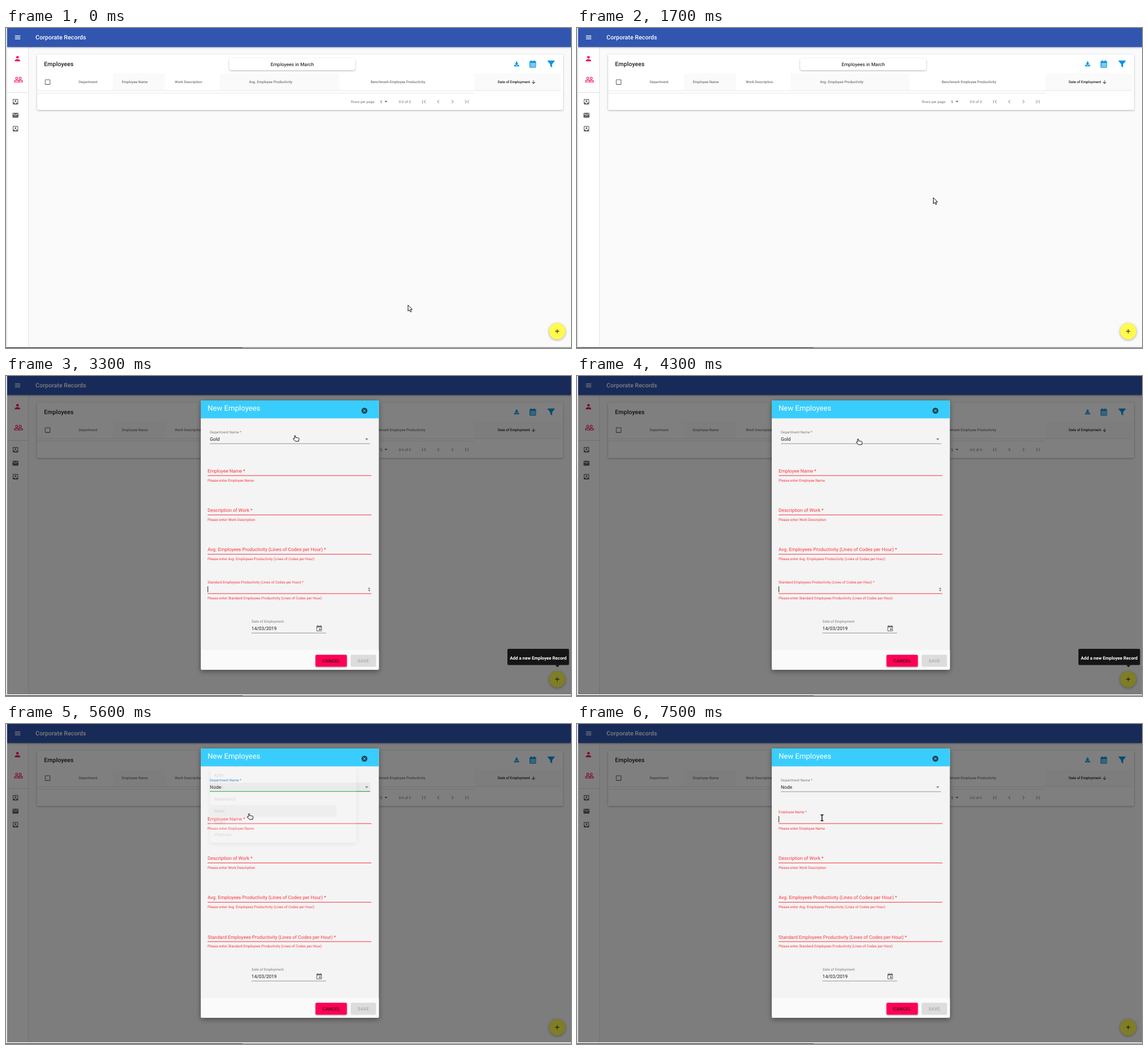
Recreate the animation shown at these times as an HTML page. Size 995 by 563 pixels, loop 8000 ms.

```html
<!DOCTYPE html>
<html lang="en">
<head>
<meta charset="utf-8">
<title>Corporate Records</title>
<style>
  html, body { margin: 0; width: 100%; height: 100%; overflow: hidden; background: #fafafa; }
  svg { display: block; width: 995px; height: 563px; font-family: Roboto, sans-serif; text-rendering: geometricPrecision; }
  text { white-space: pre; }
  .card { filter: drop-shadow(0 1px 1.5px rgba(0,0,0,.3)); }
  .raised { filter: drop-shadow(0 1.5px 2px rgba(0,0,0,.35)); }
  .high { filter: drop-shadow(0 3px 5px rgba(0,0,0,.4)); }
  #menu { transform-origin: 359px 112px; }
  #tip { transform-origin: 971px 513px; }
</style>
</head>
<body>
<svg id="stage" viewBox="0 0 995 563"></svg>
<script>
const LOOP = 8000;
const GREY = '#757575', RED = '#f9343f', BLUE = '#0596de', PINK = '#f50057', INK = '#1c1c1c';
const SMALL = 6.28, BODY = 8.38, TITLE = 10.47;

// 24 x 24 glyphs
const glyphs = {
  burger: 'M3 18h18v-2H3zM3 13h18v-2H3zM3 6v2h18V6z',
  person: 'M12 12a4 4 0 1 0 0-8 4 4 0 0 0 0 8zm0 2c-2.67 0-8 1.34-8 4v2h16v-2c0-2.66-5.33-4-8-4z',
  inbox: 'M19 3H5a2 2 0 0 0-2 2v14c0 1.1.9 2 2 2h14a2 2 0 0 0 2-2V5a2 2 0 0 0-2-2zm0 12h-4a3 3 0 0 1-6 0H5V5h14zm-3-5h-2V7h-4v3H8l4 4z',
  mail: 'M20 4H4a2 2 0 0 0-2 2v12c0 1.1.9 2 2 2h16a2 2 0 0 0 2-2V6a2 2 0 0 0-2-2zm0 4l-8 5-8-5V6l8 5 8-5z',
  box: 'M19 5v14H5V5h14m0-2H5a2 2 0 0 0-2 2v14c0 1.1.9 2 2 2h14a2 2 0 0 0 2-2V5a2 2 0 0 0-2-2z',
  down: 'M20 12l-1.4-1.4L13 16.2V4h-2v12.2l-5.6-5.6L4 12l8 8z',
  first: 'M18.4 16.6L13.8 12l4.6-4.6L17 6l-6 6 6 6zM6 6h2v12H6z',
  prev: 'M15.4 16.6L10.8 12l4.6-4.6L14 6l-6 6 6 6z',
  next: 'M8.6 16.6l4.6-4.6-4.6-4.6L10 6l6 6-6 6z',
  last: 'M5.6 7.4l4.6 4.6-4.6 4.6L7 18l6-6-6-6zM16 6h2v12h-2z',
  drop: 'M7 9.5l5 5 5-5z',
  plus: 'M19 13h-6v6h-2v-6H5v-2h6V5h2v6h6z',
  event: 'M17 12h-5v5h5zM16 1v2H8V1H6v2H5a2 2 0 0 0-2 2v14c0 1.1.9 2 2 2h14a2 2 0 0 0 2-2V5a2 2 0 0 0-2-2h-1V1zm3 18H5V8h14z',
  close: 'M12 2a10 10 0 1 0 0 20 10 10 0 0 0 0-20zm5 13.6L15.6 17 12 13.4 8.4 17 7 15.6l3.6-3.6L7 8.4 8.4 7l3.6 3.6L15.6 7 17 8.4 13.4 12z',
  download: 'M9 3h6v7h5l-8 8-8-8h5zM2 16h5l5 4 5-4h5v6H2z',
  filter: 'M1 1h22v2l-8 9v11l-6-5v-6L1 3z',
  spin: 'M12 3l5 6H7zM12 21l5-6H7z'
};

const icon = (name, x, y, color, size = 12.57) =>
  `<path d="${glyphs[name]}" fill="${color}" fill-rule="evenodd" transform="translate(${x - size / 2} ${y - size / 2}) scale(${size / 24})"/>`;
const text = (x, y, value, size = BODY, color = INK, extra = '') =>
  `<text x="${x}" y="${y}" font-size="${size}" fill="${color}" ${extra}>${value}</text>`;
const rect = (x, y, w, h, fill, extra = '') =>
  `<rect x="${x}" y="${y}" width="${w}" height="${h}" fill="${fill}" ${extra}/>`;
const group = (id, ...parts) => `<g id="${id}">${parts.join('')}</g>`;
const medium = 'font-weight="500"';
const spaced = medium + ' letter-spacing=".08"';

const people = `<g transform="translate(13.8 82.6) scale(.68)" fill="none" stroke="${PINK}" stroke-width="1.6">
  <circle cx="7.5" cy="8.5" r="2.8"/><circle cx="16.5" cy="8.5" r="2.8"/>
  <path d="M1.75 18.2v-2c0-1.4 3.4-2.5 5.75-2.5s5.75 1.1 5.75 2.5v2zM13.25 18.2h9v-2c0-1.4-3.4-2.5-5.75-2.5-1.3 0-2.7.3-3.8.8"/></g>`;

function calendar() {
  let cells = '';
  for (let row = 0; row < 3; row++)
    for (let col = 0; col < 4; col++)
      cells += rect(923.6 + col * 2.35, 61.7 + row * 2.5, 1.6, 1.7, '#fff');
  return rect(922, 58.3, 11.4, 11.5, BLUE, 'rx="1"') + rect(924.2, 57, 1.8, 3, BLUE, 'rx=".6"')
    + rect(929.3, 57, 1.8, 3, BLUE, 'rx=".6"') + cells;
}

function page() {
  const heads = [[128, 'Department'], [204, 'Employee Name'], [297.3, 'Work Description'],
    [428, 'Avg. Employee Productivity'], [642.3, 'Benchmark Employee Productivity']];
  const pager = [['first', 736], ['prev', 761.3], ['next', 786.3], ['last', 811.3]];
  return [
    rect(0, 0, 995, 563, '#fafafa'),
    rect(2, 33, 37.5, 528, '#fff'), rect(39, 33, 1, 528, '#e4e4e4'), rect(2, 113, 37, 1, '#dedede'),
    rect(2, 0, 993, 33.5, '#3156b0', 'class="card"'),
    icon('burger', 20.5, 16.5, '#fff'),
    text(52, 20.2, 'Corporate Records', TITLE, '#fff', spaced),
    icon('person', 20.2, 53.8, PINK, 14), people,
    icon('inbox', 16.7, 129.8, '#636363'), icon('mail', 16.7, 153.5, '#636363'), icon('inbox', 16.7, 177.3, '#636363'),
    rect(54.7, 46.6, 926.3, 97.7, '#fff', 'rx="2" class="card"'),
    text(67, 67.2, 'Employees', TITLE, INK, spaced),
    rect(393, 53.3, 222, 21, '#fff', 'rx="4" class="card"'),
    text(504, 66.6, 'Employees in March', BODY, '#000', 'text-anchor="middle" letter-spacing=".06"'),
    icon('download', 899.2, 63, BLUE, 10.5), calendar(), icon('filter', 960, 63.5, BLUE, 13.4),
    rect(188, 80, 92, 30, '#fafafa'), rect(376, 80, 210, 30, '#fafafa'), rect(825, 80, 152, 30, '#fafafa'),
    icon('box', 73.3, 95.2, '#636363'),
    ...heads.map(([x, label]) => text(x, 97.4, label, SMALL, GREY, medium)),
    text(866, 97.4, 'Date of Employment', SMALL, INK, medium), icon('down', 929, 95.2, INK, 9.4),
    rect(55, 109.8, 922, .8, '#e0e0e0'), rect(55, 114, 770, .8, '#e0e0e0'),
    text(607.3, 131.9, 'Rows per page:', SMALL, GREY), text(658.7, 131.9, '5', SMALL, '#555'),
    icon('drop', 669.2, 129.6, '#636363'), text(691.8, 131.9, '0-0 of 0', SMALL, GREY),
    ...pager.map(([name, x]) => icon(name, x, 129.6, '#9a9a9a')),
    `<circle cx="970.7" cy="533.6" r="14.4" fill="#fffa4d" class="raised"/>`,
    icon('plus', 970.7, 533.6, INK)
  ].join('');
}

function field(y, label, help, id = '') {
  const resting = text(355, y - 5.2, label + ' *', BODY, RED);
  const floated = text(355, y - 18, label + ' *', SMALL, RED);
  return (id ? group(id + 'Rest', resting) + group(id + 'Float', floated) : resting)
    + rect(355, y - .3, 288.5, 1, RED) + text(355, y + 10.6, 'Please enter ' + help, SMALL, RED);
}

function dialog() {
  const avg = 'Avg. Employees Productivity (Lines of Codes per Hour)';
  const standard = 'Standard Employees Productivity (Lines of Codes per Hour)';
  const department = color => text(359, 100.7, 'Department Name *', SMALL, color);
  return group('dialog',
    rect(2, 0, 993, 560, 'rgba(0,0,0,.5)'),
    rect(343, 43, 313.6, 473.7, '#f4f4f4', 'rx="2" class="high"'),
    `<path d="M343 74.5V45q0-2 2-2h309.6q2 0 2 2v29.5z" fill="#39cdfd"/>`,
    rect(343, 482, 313.6, 34.7, '#fafafa', 'rx="2"'),
    text(355, 61, 'New Employees', 13.08, '#fff'),
    icon('close', 631.2, 61, '#124252'),
    group('plain', department('#7a7a7a'), rect(359, 118.6, 282.3, .9, '#8b8b8b')),
    group('focused', rect(359, 103.5, 282.3, 15, '#e8e8e8'), department('#0a78c8'), rect(359, 118, 282.3, 1.2, '#27a844')),
    group('gold', text(359, 114, 'Gold')), group('node', text(359, 114, 'Node')),
    icon('drop', 635.2, 111.3, '#666'),
    field(175, 'Employee Name', 'Employee Name', 'name'),
    field(244.2, 'Description of Work', 'Work Description'),
    field(313.4, avg, avg),
    field(382.7, standard, standard, 'std'),
    group('spinner', icon('spin', 639.6, 375.5, '#444', 8.6)),
    group('stdCaret', rect(355, 370, 1, 10.5, '#222')),
    group('nameCaret', rect(355, 162, 1, 11, '#222')),
    text(432.4, 434, 'Date of Employment', SMALL, '#7a7a7a'),
    text(432.2, 447, '14/03/2019'),
    rect(432.2, 451.7, 131.5, .9, '#8b8b8b'), icon('event', 551.5, 444.3, '#666'),
    rect(545, 490.5, 55.3, 21, '#ff0057', 'rx="2" class="card"'),
    text(572.6, 503.6, 'CANCEL', 7.85, '#33000f', medium + ' text-anchor="middle" letter-spacing=".22"'),
    rect(607, 490.5, 44.7, 21, '#dcdcdc', 'rx="2"'),
    text(629.4, 503.6, 'SAVE', 7.85, '#a9a9a9', medium + ' text-anchor="middle" letter-spacing=".22"'));
}

function menu() {
  const items = ['KZW', 'Gold', 'Material-UI', 'Node', 'React', 'Platinum'];
  const rowY = i => 73.4 + i * 25.1;
  const bar = i => rect(359.3, rowY(i), 282.4, 25.1, '#e0e0e0');
  const label = (i, extra) => text(367.6, rowY(i) + 15.5, items[i], BODY, INK, extra);
  return group('menu',
    rect(359.3, 69.7, 282.4, 158.3, '#fff', 'rx="2" class="high"'),
    group('hover', rect(359.3, rowY(3), 282.4, 25.1, '#ebebeb')),
    group('pickGold', bar(1), label(1, medium), label(3)),
    group('pickNode', rect(359.3, rowY(3), 244, 25.1, '#cfcfcf'), label(1), label(3, medium)),
    [0, 2, 4, 5].map(i => label(i)).join(''));
}

const tooltip = group('tip',
  rect(883, 480, 108.6, 28.6, 'rgba(10,10,10,.9)', 'rx="2"'),
  `<path d="M967.3 508.6h7.6l-3.8 4z" fill="rgba(10,10,10,.9)"/>`,
  text(937.3, 498.7, 'Add a new Employee Record', 7.85, '#fff', 'font-weight="700" text-anchor="middle"'));

const frame = rect(0, 0, 2, 563, '#e2e2e8') + rect(0, 560, 995, 2, '#e9e9e9')
  + rect(0, 562, 417, 1, '#2a1c2c') + rect(417, 562, 578, 1, '#77757a');

const pointer = group('cursor',
  `<g id="arrow"><path d="M.5.5v10.6l2.5-2.2 1.8 3.8 1.7-.8-1.8-3.8h3.4z" fill="#fff" stroke="#111"/></g>`,
  `<g id="hand"><path d="M3 1.2q1-1.2 1.9 0v3l4.7.7q1.8.4 1.6 2l-.9 4H5L1 7.3Q.4 5.800 1.700 5.900L3 6.400z" fill="#fff" stroke="#111"/></g>`,
  `<g id="beam"><path d="M1 .8h1.500l1 .7 1-.7H6M1 11.200h1.500l1-.7 1 .7H6M3.500 1.500v9" fill="none" stroke="#111" stroke-width="1.500"/></g>`);

document.getElementById('stage').innerHTML = page() + dialog() + menu() + tooltip + frame + pointer;

// Plays rows of [ms, styles] as hard steps.
function play(id, rows) {
  const keys = rows.map(([ms, style]) => ({ ...style, offset: ms / LOOP, easing: 'steps(1, end)' }));
  keys.push({ ...rows[rows.length - 1][1], offset: 1 });
  document.getElementById(id).animate(keys, { duration: LOOP, iterations: Infinity });
}

// Shows a part during [from, to) spans.
function show(id, ...spans) {
  const rows = [[0, { opacity: spans[0][0] === 0 ? 1 : 0 }]];
  for (const [from, to] of spans) {
    if (from > 0) rows.push([from, { opacity: 1 }]);
    if (to < LOOP) rows.push([to, { opacity: 0 }]);
  }
  play(id, rows);
}

const sweep = Array.from({ length: 9 }, (_, i) => {
  const p = (i + 1) / 9, eased = p * p * (3 - 2 * p);
  return [300 + i * 100, 'arrow', 708 - 376 * eased, 487 - 255 * eased];
});
const path = [
  [0, 'arrow', 707.5, 487], ...sweep,
  [1500, 'arrow', 420, 252], [1600, 'arrow', 540, 284], [1700, 'arrow', 627, 298], [1800, 'arrow', 649, 294],
  [1900, 'none', 649, 294], [2300, 'hand', 965.5, 531],
  [3300, 'hand', 505, 104], [3500, 'beam', 524, 170], [3700, 'arrow', 496, 202], [3900, 'arrow', 479, 181],
  [4100, 'arrow', 485, 125], [4300, 'hand', 491, 110], [4900, 'hand', 449.5, 137], [5100, 'hand', 435, 148],
  [5300, 'hand', 424, 157], [5900, 'beam', 428, 159]
];
play('cursor', path.map(([ms, , x, y]) => [ms, { transform: `translate(${x}px, ${y}px)` }]));
for (const shape of ['arrow', 'hand', 'beam'])
  play(shape, path.map(([ms, kind]) => [ms, { opacity: kind === shape ? 1 : 0 }]));

const grow = (opacity, s) => ({ opacity, transform: `scale(${s}, ${s * s})` });
play('tip', [[0, grow(0, .75)], [2300, grow(.1, .8)], [2400, grow(.55, .93)], [2500, grow(.88, .985)],
  [2600, grow(1, 1)], [5600, grow(0, 1)]]);
play('menu', [[0, grow(0, 1)], [4900, grow(1, 1)], [5600, grow(.15, .913)], [5900, grow(0, .75)]]);

show('dialog', [3300, LOOP]);
show('gold', [0, 5600]);
show('node', [5600, LOOP]);
show('plain', [0, 5600], [6500, LOOP]);
show('focused', [5600, 6500]);
show('hover', [5300, 5600]);
show('pickGold', [0, 5600]);
show('pickNode', [5600, LOOP]);
show('stdFloat', [0, 4900]);
show('stdRest', [4900, LOOP]);
show('spinner', [0, 4900]);
show('stdCaret', [0, 3500], [4100, 4900]);
show('nameRest', [0, 6500]);
show('nameFloat', [6500, LOOP]);
show('nameCaret', [6500, 6800], [7500, LOOP]);
</script>
</body>
</html>
```
